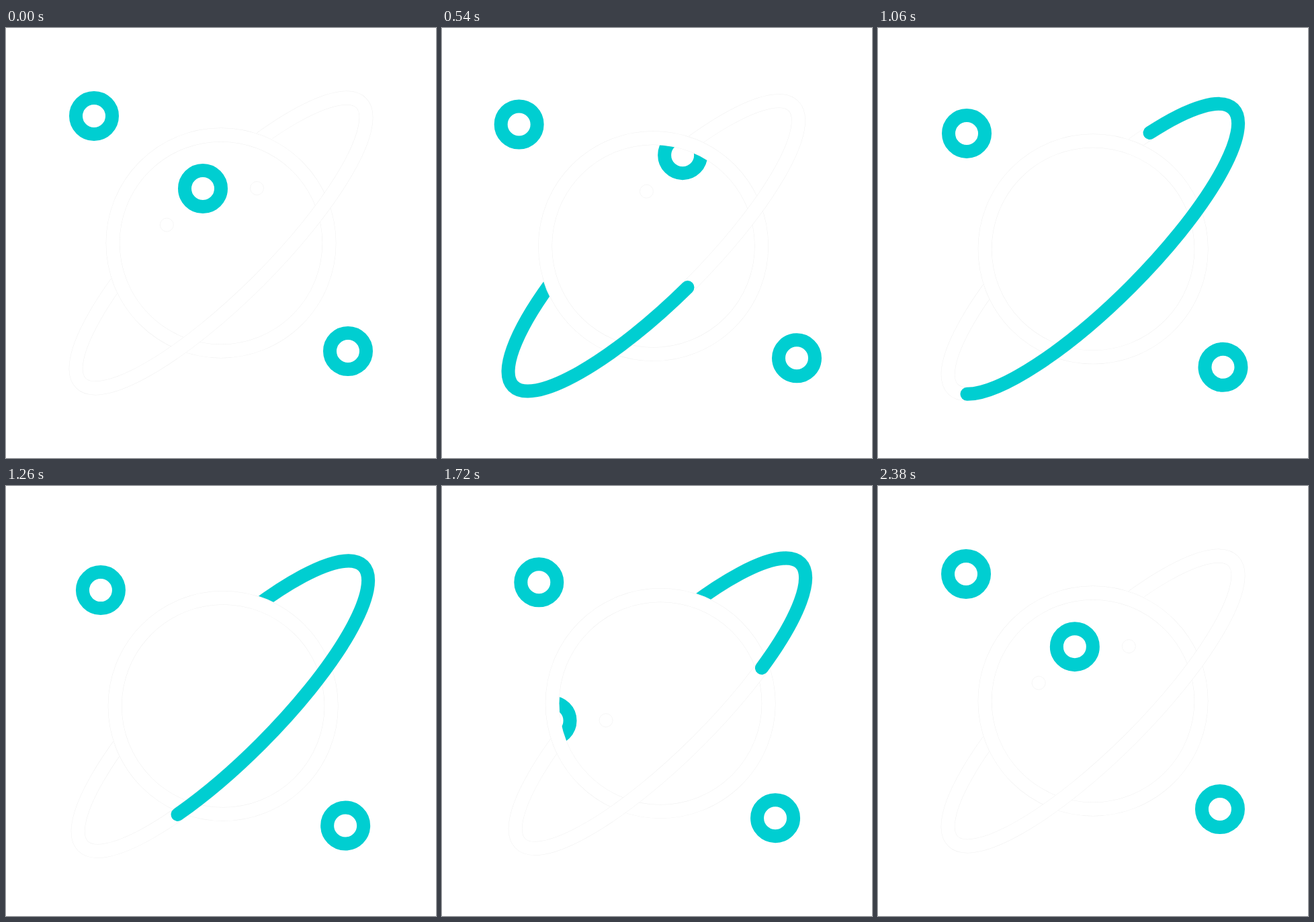
These frames come from a looping animation (640 px wide and 640 px high, 2.4 s). An HTML page:

```html
<!DOCTYPE html>
<html lang="en">
<head>
<meta charset="utf-8">
<title>Planet</title>
<style>
  html, body { margin: 0; width: 100%; height: 100%; overflow: hidden; background: #fff; }
  svg { display: block; width: 100%; height: 100%; }
  .line { fill: none; stroke: #00ced1; stroke-width: 20; stroke-linecap: round; }
  .edge { fill: none; stroke: #f0f0f0; stroke-width: 20.8; }
  .white { fill: none; stroke: #fff; stroke-width: 19.8; }
  .dot { fill: #fff; stroke: #f0f0f0; stroke-width: .6; }
</style>
</head>
<body>
<svg viewBox="0 0 640 640">
  <defs>
    <clipPath id="disk"><circle r="161"/></clipPath>
    <!-- everything except the half disk that hides the back of the ring -->
    <clipPath id="front">
      <path clip-rule="evenodd" d="M-400-400H400V400H-400ZM-172 0A172 172 0 0 1 172 0Z"/>
    </clipPath>
    <path id="orbit" d="M0-79.5A295 79.5 0 0 0 0 79.5A295 79.5 0 0 0 0-79.5"/>
  </defs>
  <g id="planet">
    <g clip-path="url(#disk)">
      <g id="craters">
        <circle class="line" cx="-27" cy="-81" r="27"/>
        <circle class="dot" cx="-80.7" cy="-27" r="10"/>
        <circle class="dot" cx="53.5" cy="-81.5" r="10"/>
      </g>
    </g>
    <circle class="edge" r="161"/>
    <circle class="white" r="161"/>
    <g transform="rotate(-45)" clip-path="url(#front)">
      <use href="#orbit" class="edge"/>
      <use href="#orbit" class="white"/>
      <use href="#orbit" class="line" id="trail"/>
    </g>
  </g>
  <circle id="starA" class="line" r="27"/>
  <circle id="starB" class="line" r="27"/>
</svg>
<script>
const LOOP = 2400, HALF = LOOP / 2;
const $ = id => document.getElementById(id);
const planet = $('planet'), craters = $('craters'), trail = $('trail');
const starA = $('starA'), starB = $('starB');

const ease = p => p * p * (3 - 2 * p);

function move(el, x, y) {
  el.setAttribute('transform', `translate(${x.toFixed(3)} ${y.toFixed(3)})`);
}

// smooth round trip from home (x, y) through evenly timed offsets
function drift(el, x, y, stops, t) {
  const at = i => stops[i - 1] || [0, 0];
  const last = stops.length + 1;
  const s = t / LOOP * last, i = Math.floor(s);
  const p = s - i, q = 1 - p;
  const axis = k => {
    const slope = n => n % last ? (at(n + 1)[k] - at(n - 1)[k]) / 2 : 0;
    return at(i)[k] * ease(q) + at(i + 1)[k] * ease(p)
      + p * q * (slope(i) * q - slope(i + 1) * p);
  };
  move(el, x + axis(0), y + axis(1));
}

function draw(t) {
  drift(planet, 320, 320, [[-5.5, 3.9], [-1.2, 9], [5, 5.8], [4.2, 2]], t);
  drift(starA, 131, 131, [[-16.6, 10.7], [-2.9, 25.5], [15.1, 20.8], [9.5, 6.4]], t);
  drift(starB, 509, 481, [[18.9, 8.7], [8, 22.5], [-9.6, 22.8], [-12.2, 6.2]], t);

  // the surface leaves at the upper right and returns from the lower left
  const k = ease(Math.min(t, LOOP - t) / HALF);
  if (t < HALF) move(craters, 165.5 * k, -127.5 * k);
  else move(craters, -225 * k, 178.5 * k);

  // the trail grows along the orbit, then its tail follows
  const head = Math.min(149 + 0.889 * t, 1240);
  const tail = Math.max(149, 153 + 0.6665 * (t - 778));
  const len = Math.max(head - tail, 0);
  trail.style.display = len > 1 ? '' : 'none';
  trail.setAttribute('stroke-dasharray', `${len} 3000`);
  trail.setAttribute('stroke-dashoffset', -tail);
}

const start = performance.now();
function tick() {
  draw((performance.now() - start) % LOOP);
  requestAnimationFrame(tick);
}
draw(0);
requestAnimationFrame(tick);
</script>
</body>
</html>
```
